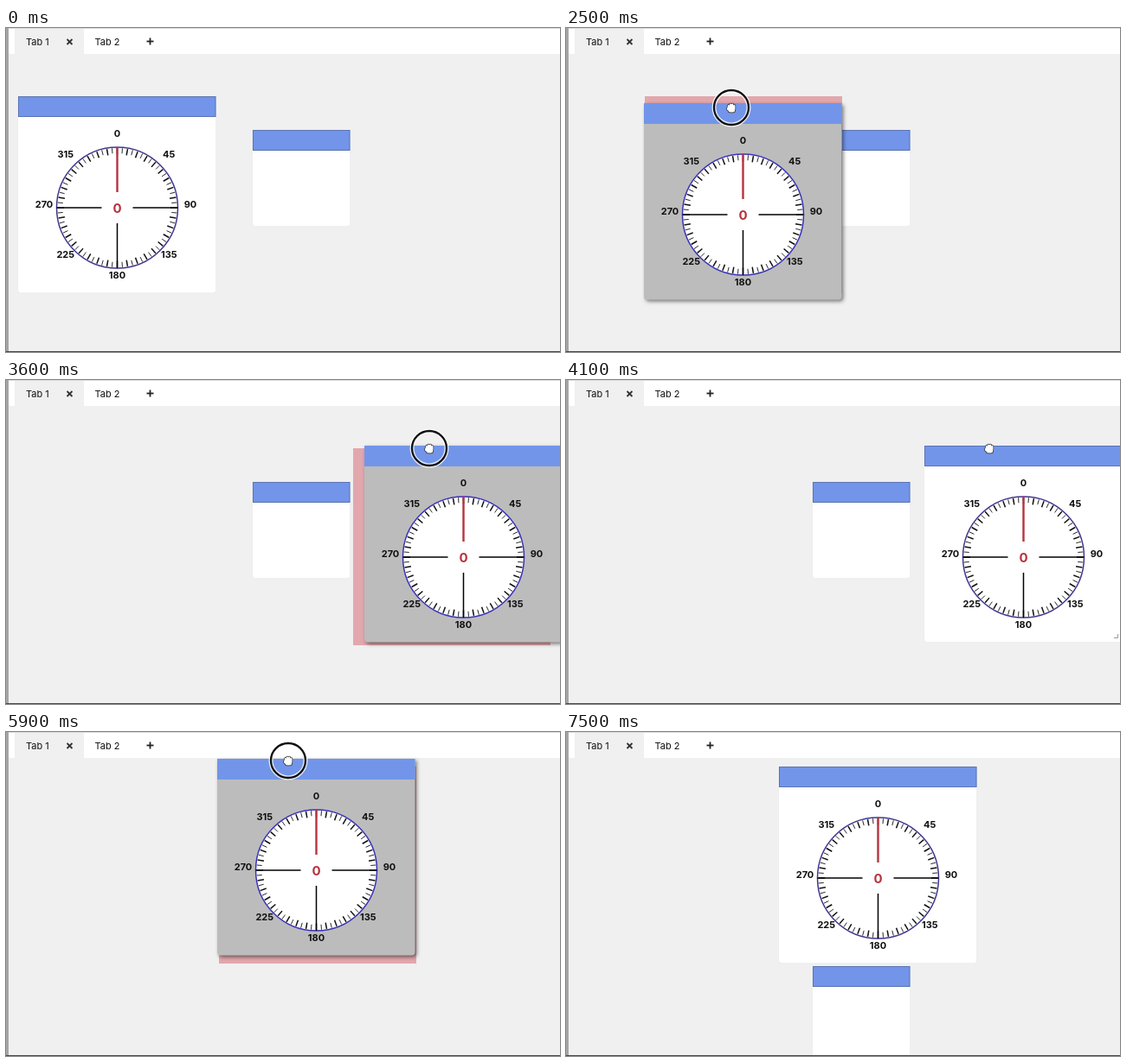
Recreate the animation shown at these times as an HTML page with a canvas. Size 640 by 375 pixels, loop 7.6 s.

```html
<!DOCTYPE html>
<html lang="en">
<head>
<meta charset="utf-8">
<title>Dashboard drag</title>
<style>
html, body { margin: 0; height: 100%; overflow: hidden; background: #f0f0f0; }
canvas { display: block; }
</style>
</head>
<body>
<canvas width="640" height="375"></canvas>
<script>
const g = document.querySelector('canvas').getContext('2d');
const LOOP = 7600, STEP = 100, PITCH = 38.7;
const BLUE = '#7295ea', RED = '#b5343f';

// Rows of time, x, y
const gaugePath = [
  [2100, 14, 79], [2200, 18, 81], [2300, 58, 85], [2500, 90, 87], [2700, 152, 92],
  [2800, 182, 90], [2900, 270, 84], [3000, 385, 79], [3100, 391, 77], [3300, 414, 76],
  [4100, 414, 76], [4300, 401, 79], [4800, 401, 79], [5000, 380, 76], [5100, 340, 66],
  [5200, 296, 52], [5500, 247, 40], [5900, 244, 31], [6300, 244, 31], [6500, 246, 40]
];
const cursorPath = [
  [1500, 240, 190], [2000, 94, 83], [2200, 100, 85], [2500, 191, 92], [2800, 290, 92],
  [3000, 466, 82], [3100, 474, 80], [3300, 489, 79], [4800, 489, 79], [5000, 448, 74],
  [5200, 361, 44], [5500, 330, 36], [5900, 326, 33]
];
const smallPath = [[6250, 285, 118], [6500, 285, 271]];

function at(path, t) {
  const i = path.findIndex(p => p[0] > t);
  if (i < 1) return (i ? path[path.length - 1] : path[0]).slice(1);
  const [a, b] = [path[i - 1], path[i]];
  const k = (t - a[0]) / (b[0] - a[0]);
  return [a[1] + (b[1] - a[1]) * k, a[2] + (b[2] - a[2]) * k];
}

const within = (t, a, b) => t >= a && t < b;

function rect(x, y, w, h, color) {
  g.fillStyle = color;
  g.fillRect(x, y, w, h);
}

function line(color, width, ...pts) {
  g.beginPath();
  pts.forEach(p => g.lineTo(...p));
  g.strokeStyle = color;
  g.lineWidth = width;
  g.stroke();
}

function text(s, x, y, font, color = '#111', align = 'center') {
  g.font = font + ' Inter, sans-serif';
  g.fillStyle = color;
  g.textAlign = align;
  g.fillText(s, x, y);
}

function circle(x, y, r, stroke, width, fill) {
  g.beginPath();
  g.arc(x, y, r, 0, 7);
  if (fill) { g.fillStyle = fill; g.fill(); }
  g.strokeStyle = stroke;
  g.lineWidth = width;
  g.stroke();
}

function panel(x, y, w, h, dragging) {
  g.save();
  g.shadowColor = dragging ? 'rgba(0,0,0,.5)' : 'rgba(0,0,0,.12)';
  g.shadowBlur = dragging ? 4 : 1;
  g.shadowOffsetX = g.shadowOffsetY = dragging ? 2 : 0;
  g.beginPath();
  g.roundRect(x, y, w, h, [1, 1, 4, 4]);
  g.fillStyle = dragging ? '#bcbcbc' : '#fff';
  g.fill();
  g.restore();
  rect(x, y, w, 24, BLUE);
  if (!dragging) {
    g.strokeStyle = 'rgba(70,85,130,.5)';
    g.lineWidth = 1;
    g.strokeRect(x + .5, y + .5, w - 1, 23);
  }
}

function dial(cx, cy, dragging) {
  const polar = (deg, r) => {
    const a = deg * Math.PI / 180;
    return [cx + r * Math.sin(a), cy - r * Math.cos(a)];
  };
  circle(cx, cy, 70, dragging ? '#3a32b8' : '#40388f', 1.5, '#fff');
  for (let d = 0; d < 360; d += 5) {
    const major = d % 10 === 0;
    line('#111', major ? 1.5 : .9, polar(d, 69), polar(d, major ? 61.5 : 63));
  }
  for (let d = 0; d < 360; d += 90)
    line(d ? '#000' : RED, d ? 1.5 : 2.4, polar(d, 70), polar(d, 18));
  for (let d = 0; d < 360; d += 45) {
    const a = d * Math.PI / 180;
    text(d, cx + 84.5 * Math.sin(a), cy - 82 * Math.cos(a), 'bold 11px');
  }
  text('0', cx, cy + 5.5, 'bold 15px', RED);
}

function hand(x, y) {
  g.beginPath();
  for (const [dx, dy] of [[-3.3, -3], [-1.1, -4.5], [1.1, -4.5], [3.3, -3]])
    g.roundRect(x + dx - 1, y + dy, 2.2, 6, 1);
  g.roundRect(x - 5, y - .5, 3, 4, 1.4);
  g.roundRect(x - 3.5, y, 7.6, 5.5, 2);
  g.strokeStyle = '#222';
  g.lineWidth = 1.3;
  g.stroke();
  g.fillStyle = '#fff';
  g.fill();
}

function arrow(x, y) {
  g.beginPath();
  for (const [dx, dy] of [[0, 0], [0, 9.5], [2.2, 7.5], [3.6, 10.5], [5, 9.8], [3.7, 7], [6.5, 6.8]])
    g.lineTo(x + dx, y + dy);
  g.closePath();
  g.strokeStyle = '#fff';
  g.lineWidth = 1.5;
  g.stroke();
  g.fillStyle = '#111';
  g.fill();
}

function tabs() {
  rect(3, 0, 637, 30, '#fff');
  rect(10, 0, 80, 30, '#f0f0f0');
  rect(0, 0, 640, 1, '#dcdcdc');
  rect(0, 0, 3, 375, '#a4a4a4');
  rect(0, 374, 640, 1, '#1c661c');
  text('Tab 1', 23, 19.5, '11px', '#111', 'left');
  text('Tab 2', 102.5, 19.5, '11px', '#111', 'left');
  line('#333', 1.8, [70.5, 13], [76.5, 19]);
  line('#333', 1.8, [76.5, 13], [70.5, 19]);
  line('#222', 1.8, [162.5, 15.5], [170.5, 15.5]);
  line('#222', 1.8, [166.5, 11.5], [166.5, 19.5]);
}

function draw(t) {
  const dragging = within(t, 2200, 4050) || within(t, 4800, 6300);
  const hovered = within(t, 1900, 6900) && !dragging;
  const [x, y] = at(gaugePath, t).map(Math.round);
  const [sx, sy] = at(smallPath, t);

  rect(0, 0, 640, 375, '#f0f0f0');
  tabs();
  panel(sx, sy, 112.5, 111.5, false);
  if (dragging) {
    const [px, py] = at(gaugePath, t - STEP);
    const snap = (v, origin) => Math.round(origin + PITCH * Math.round((v - origin) / PITCH));
    rect(snap(px, 14), snap(py, 40), 228, 228, '#e2a7ad');
  }
  panel(x, y, 228.5, 227.5, dragging);
  dial(x + 114.5, y + 129, dragging);
  if (hovered) line('#999', 1, [x + 219, y + 222.5], [x + 223.5, y + 222.5], [x + 223.5, y + 218]);
  rect(0, 374, 640, 1, '#1c661c');

  if (within(t, 1500, 6900)) {
    const [cx, cy] = at(cursorPath, t);
    if (dragging) {
      circle(cx, cy, 20, 'rgba(255,255,255,.8)', 5);
      circle(cx, cy, 20, '#111', 2.3);
    }
    (t < 1900 || within(t, 5100, 5400) ? arrow : hand)(cx, cy);
  }
}

function frame(now) {
  draw(Math.floor(now % LOOP / STEP) * STEP);
  requestAnimationFrame(frame);
}
requestAnimationFrame(frame);
</script>
</body>
</html>
```
